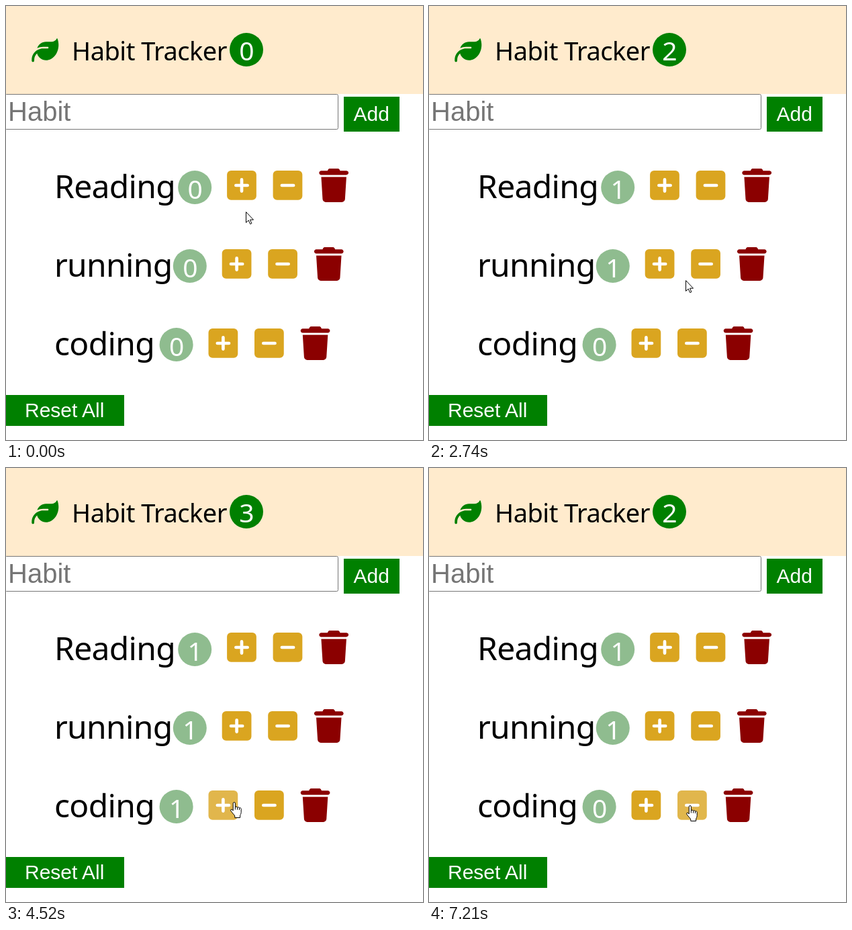
Recreate the animation shown at these times as an HTML page. Size 621 px wide and 646 px high, loop 8000 ms.

```html
<!DOCTYPE html>
<html lang="en">
<head>
<meta charset="utf-8">
<title>Habit Tracker</title>
<style>
  html, body { margin: 0; width: 100%; height: 100%; overflow: hidden; background: #fff; }
  svg { display: block; width: 621px; height: 646px; }
  text { font-family: "Noto Sans", "Open Sans", sans-serif; }
  .title { font-size: 38px; letter-spacing: -.5px; }
  .name { font-size: 48px; letter-spacing: -.7px; }
  .count { font-size: 39px; fill: #fff; text-anchor: middle; }
  .form { font-family: "Liberation Sans", Arial, sans-serif; font-size: 30px; fill: #fff; }
  .hint { font-size: 40px; fill: #757575; }
  .green { fill: #008000; }
  .tally { fill: #8fbc8f; }
  .button { fill: #daa520; }
  .hover { opacity: .8; }
  .trash { fill: #8b0000; }
  .sign { stroke: #fff; stroke-width: 4.7; stroke-linecap: round; }
  .pointer { fill: #fff; stroke: #000; stroke-linejoin: round; }
</style>
</head>
<body>
<svg viewBox="0 0 621 646">
  <defs>
    <path id="trash" class="trash" transform="scale(.09766)" d="M135.2 17.7L128 32H32C14.3 32 0 46.3 0 64S14.3 96 32 96H416c17.7 0 32-14.3 32-32s-14.3-32-32-32H320l-7.2-14.3C307.4 6.8 296.3 0 284.2 0H163.8c-12.1 0-23.2 6.8-28.6 17.7zM416 128H32L53.2 467c1.6 25.3 22.6 45 47.9 45H346.9c25.3 0 46.3-19.7 47.9-45z"/>
  </defs>

  <rect width="621" height="131" fill="#ffebcd"/>
  <path class="green" transform="translate(38.3 45.8) scale(.078125)" d="M272 96c-78.6 0-145.1 51.5-167.7 122.5c33.6-17 71.5-26.5 111.7-26.5h88c8.8 0 16 7.2 16 16s-7.2 16-16 16H216c-16.6 0-32.7 1.9-48.3 5.4c-25.9 5.9-49.9 16.4-71.4 30.7C38.3 298.8 0 364.9 0 440v16c0 13.3 10.7 24 24 24s24-10.7 24-24V440c0-48.7 20.7-92.5 53.8-123.2C121.6 392.3 190.3 448 272 448h1c132.1-.7 239-130.9 239-291.4c0-42.6-7.5-83.1-21.1-119.6c-2.6-6.9-12.7-6.6-16.2-.1C455.9 72.1 418.7 96 376 96z"/>
  <text class="title" x="98" y="81">Habit Tracker</text>
  <circle class="green" cx="358" cy="65" r="25"/>
  <text class="count" id="total" x="358.5" y="81">0</text>

  <rect x="-1.5" y="131.5" width="496" height="52" rx="2" fill="#fff" stroke="#767676"/>
  <text class="form hint" x="3" y="171">Habit</text>
  <rect class="green" x="503" y="135" width="83" height="52"/>
  <text class="form" x="517.5" y="171">Add</text>

  <g id="rows"></g>

  <rect class="green" y="579" width="176" height="46"/>
  <text class="form" x="28" y="612">Reset All</text>

  <circle id="press" r="15" fill="#ff0" fill-opacity=".47"/>
  <path id="arrow" class="pointer" d="M.5.6V16.4L4.2 13l2.5 5.6 2.2-1L6.5 12.2H11.5Z"/>
  <g id="hand" class="pointer">
    <path transform="translate(-5)" d="M4.2 13V2.2a1.6 1.6 0 0 1 3.2 0V8c.4-1.2 3-1.1 3.1.4.5-1 2.9-.7 2.9.8.8-.9 2.8-.4 2.8 1.3V15.500c0 2.500-1.500 3.500-1.600 5.500V23.500H6.800V21C5.500 18.500 2.500 16 .8 13.200c-.8-1.600 1-2.700 2.200-1.600Z"/>
    <path transform="translate(-5)" fill="none" d="M7.4 8v3.500M10.500 8.400v3.300M13.400 9.200v2.800"/>
  </g>
</svg>
<script>
const LOOP = 8000;
const STEP = 100;
const SIZE = 43.75;
const $ = id => document.getElementById(id);

const habits = [
  { name: "Reading", badge: 281.2 },
  { name: "running", badge: 273.8 },
  { name: "coding", badge: 253.6 }
];

const home = { x: 357, y: 306 };
const glides = [
  { from: 100, until: 320, x: 346, y: 268 },
  { from: 1210, until: 1510, x: 356, y: 392 },
  { from: 1610, until: 1610, x: 351, y: 392 },
  { from: 2630, until: 2740, x: 382, y: 408 },
  { from: 2840, until: 2840, x: 392, y: 403 },
  { from: 2930, until: 3430, x: 335, y: 507 },
  { from: 4120 + STEP, until: 4320, x: 373, y: 504 },
  { from: 4410, until: 4510, x: 339, y: 497 },
  { from: 5220, until: 5510, x: 388, y: 502 }
];

// A click counts on release; quick taps show no highlight.
const clicks = [
  { at: 800, held: 180 }, { at: 1890, held: 100 }, { at: 3720, held: 100 },
  { at: 4810, held: 0 }, { at: 5010, held: 0 }, { at: 5120, held: 0 },
  { at: 5700, held: 100 }, { at: 5920, held: 100 }, { at: 6330, held: 100 },
  { at: 7210, held: 190 }
];

const buttons = [];

function button(x, y, habit, change) {
  buttons.push({ x, y, habit, change });
  const upright = change > 0 ? "m-8.600-8.600v17.200" : "";
  return `<g class="button" transform="translate(${x} ${y})">
    <rect width="${SIZE}" height="${SIZE}" rx="6"/>
    <path class="sign" d="M13.300 21.900h17.200${upright}"/></g>`;
}

$("rows").innerHTML = habits.map(({ name, badge }, i) => {
  const top = Math.round(242 + i * 117.4);
  const base = 286 + i * 117;
  const plus = badge + 47.9;
  return `<text class="name" x="72" y="${base}">${name}</text>
    <circle class="tally" cx="${badge}" cy="${base - 16}" r="25"/>
    <text class="count tallied" x="${badge + .5}" y="${base + .5}">0</text>
    ${button(plus, top + 3.1, i, 1)}
    ${button(plus + 68.5, top + 3.1, i, -1)}
    <use href="#trash" x="${plus + 137.2}" y="${top}"/>`;
}).join("");

const buttonNodes = document.querySelectorAll(".button");
const countNodes = document.querySelectorAll(".tallied");

// The cursor moves in even steps, as a screen recorder samples it.
function cursorAt(t) {
  let { x, y } = home;
  for (const glide of glides) {
    if (t < glide.from) break;
    const steps = Math.round((glide.until - glide.from) / STEP) + 1;
    const done = Math.min(1, (Math.floor((t - glide.from) / STEP) + 1) / steps);
    x += (glide.x - x) * done;
    y += (glide.y - y) * done;
  }
  return { x: Math.round(x), y: Math.round(y) };
}

const buttonAt = ({ x, y }) => buttons.find(b =>
  x >= b.x && x <= b.x + SIZE && y >= b.y && y <= b.y + SIZE);

function countsAt(t) {
  const counts = habits.map(() => 0);
  for (const { at } of clicks) {
    const hit = at <= t && buttonAt(cursorAt(at));
    if (hit) counts[hit.habit] += hit.change;
  }
  return counts;
}

const show = (id, on) => { $(id).style.display = on ? "" : "none"; };

function draw(t) {
  const cursor = cursorAt(t);
  const over = buttonAt(cursor);
  buttonNodes.forEach((node, i) => node.classList.toggle("hover", buttons[i] === over));

  for (const id of ["press", "arrow", "hand"]) {
    $(id).setAttribute("transform", `translate(${cursor.x} ${cursor.y})`);
  }
  show("arrow", !over);
  show("hand", over);
  show("press", clicks.some(({ at, held }) => t >= at - held && t < at));

  const counts = countsAt(t);
  countNodes.forEach((node, i) => { node.textContent = counts[i]; });
  $("total").textContent = counts.filter(Boolean).length;
}

const origin = performance.now();
function tick() {
  draw((performance.now() - origin) % LOOP);
  requestAnimationFrame(tick);
}
tick();
</script>
</body>
</html>
```
